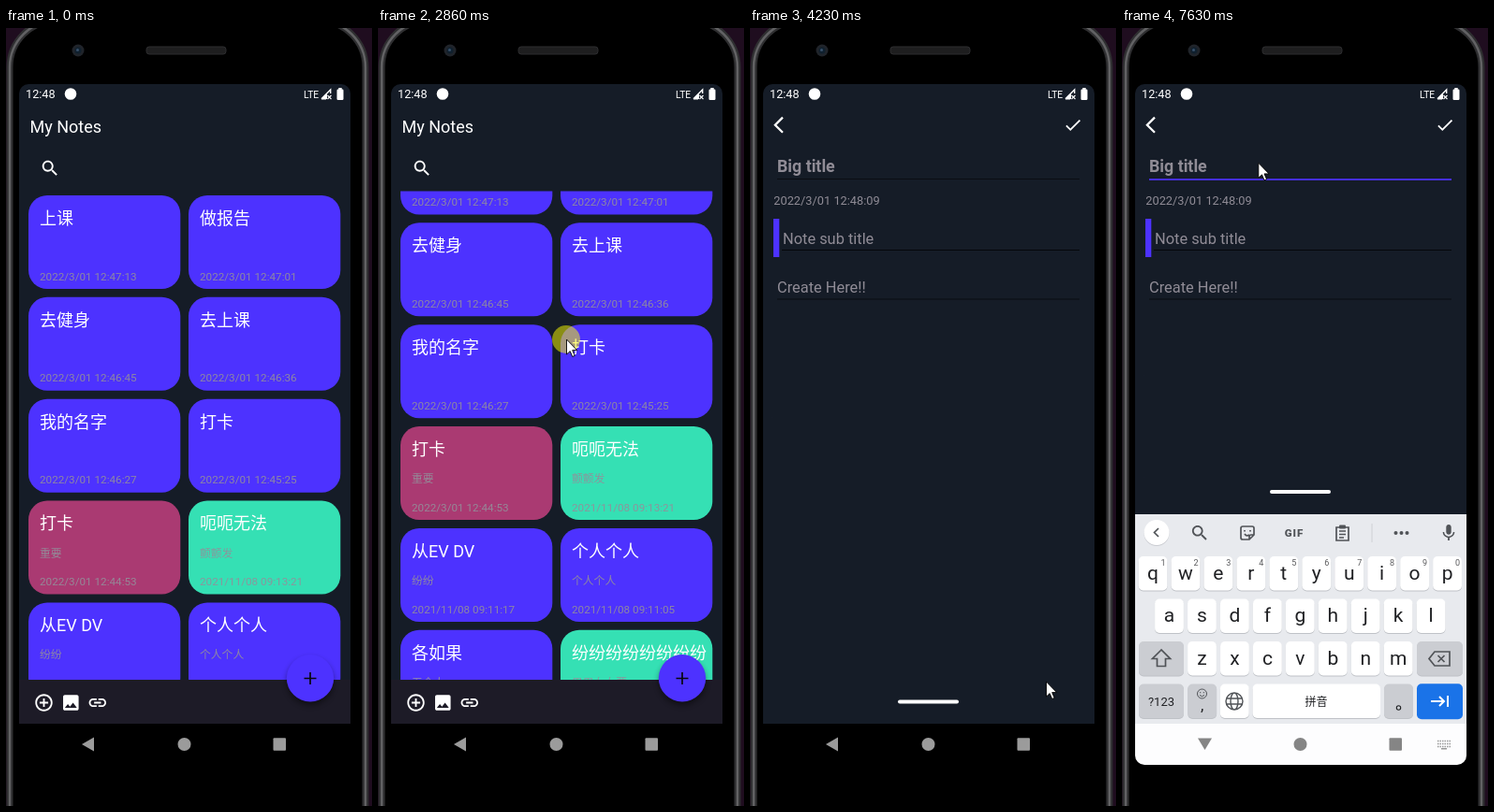
These frames come from a looping animation (391x832 px, 8 s). An HTML page:

```html
<!DOCTYPE html>
<html lang="zh-CN">
<head>
<meta charset="utf-8">
<style>
html, body { margin: 0; width: 100%; height: 100%; overflow: hidden; background: #1f0d1f; }
svg { display: block; width: 391px; height: 832px; }
text { font-family: Roboto, "Noto Sans CJK SC", "Noto Sans CJK", sans-serif; fill: #fff; white-space: pre; }
.dim { fill: #938f9a; opacity: .92; }
.hint { fill: #908c96; }
.key { fill: #202124; text-anchor: middle; }
.line { fill: none; stroke: #505357; stroke-width: 1.7; }
</style>
</head>
<body>
<svg id="stage" viewBox="0 0 391 832"></svg>
<script>
const BLUE = '#4d32ff', PINK = '#aa3a72', TEAL = '#35e0b4';

const rect = (x, y, w, h, fill, r = 0, more = '') =>
  `<rect x="${x}" y="${y}" width="${w}" height="${h}" rx="${r}" fill="${fill}" ${more}/>`;
const disc = (x, y, r, fill, more = '') => `<circle cx="${x}" cy="${y}" r="${r}" fill="${fill}" ${more}/>`;
const text = (x, y, size, str, more = '') => `<text x="${x}" y="${y}" font-size="${size}" ${more}>${str}</text>`;
const path = (d, more = '') => `<path d="${d}" ${more}/>`;
// 24-unit icon centred on a point
const icon = (x, y, scale, d, fill = '#fff') =>
  path(d, `fill="${fill}" transform="translate(${x} ${y}) scale(${scale}) translate(-12 -12)"`);

const ICONS = {
  search: 'M15.5 14h-.79l-.28-.27C15.41 12.59 16 11.11 16 9.5 16 5.91 13.09 3 9.5 3S3 5.91 3 9.5 5.91 16 9.5 16c1.61 0 3.09-.59 4.23-1.57l.27.28v.79l5 4.99L20.49 19l-4.99-5zm-6 0C7.01 14 5 11.99 5 9.5S7.01 5 9.5 5 14 7.01 14 9.5 11.99 14 9.5 14z',
  add: 'M13 7h-2v4H7v2h4v4h2v-4h4v-2h-4V7zm-1-5C6.48 2 2 6.48 2 12s4.48 10 10 10 10-4.48 10-10S17.52 2 12 2zm0 18c-4.41 0-8-3.59-8-8s3.59-8 8-8 8 3.59 8 8-3.59 8-8 8z',
  image: 'M21 19V5c0-1.1-.9-2-2-2H5c-1.1 0-2 .9-2 2v14c0 1.1.9 2 2 2h14c1.1 0 2-.9 2-2zM8.5 13.5l2.5 3.01L14.5 12l4.5 6H5l3.5-4.5z',
  link: 'M3.9 12c0-1.71 1.39-3.1 3.1-3.1h4V7H7c-2.76 0-5 2.24-5 5s2.24 5 5 5h4v-1.9H7c-1.71 0-3.1-1.39-3.1-3.1zM8 13h8v-2H8v2zm9-6h-4v1.9h4c1.71 0 3.1 1.39 3.1 3.1s-1.39 3.1-3.1 3.1h-4V17h4c2.76 0 5-2.24 5-5s-2.24-5-5-5z',
  check: 'M9 16.17L4.83 12l-1.42 1.41L9 19 21 7l-1.41-1.41z',
  back: 'M17.51 3.87L15.73 2.1 5.84 12l9.9 9.9 1.77-1.77L9.38 12l8.13-8.13z',
  mic: 'M12 14c1.66 0 2.99-1.34 2.99-3L15 5c0-1.66-1.34-3-3-3S9 3.34 9 5v6c0 1.66 1.34 3 3 3zm5.3-3c0 3-2.54 5.1-5.3 5.1S6.7 14 6.7 11H5c0 3.41 2.72 6.23 6 6.72V21h2v-3.28c3.28-.48 6-3.3 6-6.72h-1.7z'
};

const NOTES = [
  ['上课', '', '2022/3/01 12:47:13'], ['做报告', '', '2022/3/01 12:47:01'],
  ['去健身', '', '2022/3/01 12:46:45'], ['去上课', '', '2022/3/01 12:46:36'],
  ['我的名字', '', '2022/3/01 12:46:27'], ['打卡', '', '2022/3/01 12:45:25'],
  ['打卡', '重要', '2022/3/01 12:44:53', PINK], ['呃呃无法', '颤颤发', '2021/11/08 09:13:21', TEAL],
  ['从EV DV', '纷纷', '2021/11/08 09:11:17'], ['个人个人', '个人个人', '2021/11/08 09:11:05'],
  ['各如果', '五个人', '2021/11/08 09:10:52'], ['纷纷纷纷纷纷纷纷', '男男女女要', '2021/11/08 09:10:40', TEAL]
];

function card([title, sub, date, color = BLUE], i) {
  const x = i % 2 ? 195 : 24, y = 179 + 108.85 * (i >> 1);
  return rect(x, y, 162.3, 100, color, 20) +
    text(x + 12, y + 30.8, 18, title) +
    text(x + 12, y + 60, 11.8, sub, 'class="dim"') +
    text(x + 12, y + 90.6, 11.7, date, 'class="dim"');
}

const phone =
  rect(4, -8, 380, 900, '#000', 50, 'stroke="#2f2f31" stroke-width="7"') +
  rect(4, -8, 380, 900, 'none', 50, 'stroke="#626264" stroke-width="2.5"') +
  rect(150, 20, 85, 8, '#1e1e1f', 3, 'stroke="#2d2d2f"') +
  disc(77, 24, 6.5, '#20242a') + disc(77, 24, 3.5, '#10202e') + disc(76.5, 23.5, 1.5, '#38506a') +
  path('M14 744V70a10 10 0 0 1 10-10H358a10 10 0 0 1 10 10V744z', 'fill="#151c27"');

const statusBar =
  text(21, 75, 12.7, '12:48') + disc(69, 70.5, 6.3, '#fff') + text(318, 74.5, 10.3, 'LTE') +
  path('M337 75.7L346.7 66V70M337 75.7H342', 'fill="none" stroke="#fff" stroke-width="1.4"') +
  path('M337 76L343 70V76z', 'fill="#fff"') +
  path('M343.5 72l4 4m0-4l-4 4', 'stroke="#fff" stroke-width="1.1"') +
  rect(353.5, 65.5, 7, 11.5, '#fff', 1.2) + rect(355.3, 64, 3.4, 2, '#fff');

const listPage = `<g id="list">
  ${text(25.5, 112, 18, 'My Notes')}${icon(47, 150, .92, ICONS.search)}
  <g clip-path="url(#view)"><g id="cards">${NOTES.map(card).join('')}</g></g>
  ${rect(14, 697, 354, 47, '#1d1b27')}
  ${icon(40.5, 721.5, .92, ICONS.add)}${icon(69.3, 721.5, .92, ICONS.image)}${icon(97.8, 721.5, .92, ICONS.link)}
  ${disc(325, 699, 25, '#000', 'opacity=".45" filter="url(#soft)"')}${disc(325, 695.3, 25.2, BLUE)}
  ${disc(323, 695.8, 22.5, '#3b28c2', 'id="ripple"')}
  ${path('M318.5 695.5h13m-6.5-6.5v13', 'stroke="#08080c" stroke-width="1.7"')}
</g>`;

const editPage = `<g id="edit">
  ${icon(30.8, 103.7, .9, ICONS.back)}${icon(345, 103.7, .9, ICONS.check)}
  ${text(29, 154, 17.8, 'Big title', 'class="hint" font-weight="700"')}
  ${rect(29, 161, 323, 1, '#0a0d13', 0, 'id="underline"')}
  ${rect(29, 136, 2, 24, BLUE, 0, 'id="caret"')}
  ${text(25.3, 189, 12.8, '2022/3/01 12:48:09', 'class="hint"')}
  ${rect(25, 204, 6.3, 41, BLUE)}${text(35, 231, 16.4, 'Note sub title', 'class="hint"')}
  ${rect(34, 237, 318, 1, '#05070a')}
  ${text(29, 283, 16.4, 'Create Here!!', 'class="hint"')}${rect(29, 289.5, 323, 1, '#0a0d13')}
  ${rect(158, 718.6, 65, 4, '#fff', 2, 'id="handle"')}
</g>`;

const navShapes = (color, arrow) =>
  path(arrow, `fill="${color}"`) + disc(190.5, 766, 7, color) + rect(285.5, 759.3, 13.5, 13.5, color, 1);
const darkNav = `<g>${navShapes('#9b9b9b', 'M81 766L94 758.5V773.5z')}</g>`;
const lightNav = `<g id="lightNav">
  ${path('M14 744H368V778a10 10 0 0 1-10 10H24a10 10 0 0 1-10-10z', 'fill="#fdfdfe"')}
  ${navShapes('#858585', 'M81 759.5H96L88.5 772z')}
  ${path('M337 762.5h14M337 765.5h14M337 768.5h14', 'stroke="#999" stroke-width="1.5" stroke-dasharray="1.5 1"')}
  ${rect(341, 770, 6, 1.5, '#999')}
</g>`;

// One key cap with its shadow
const cap = (x, y, w, fill = '#fff', h = 36.5) => rect(x, y + 1, w, h, '#bfc2c7', 5) + rect(x, y, w, h, fill, 5);
const keyRow = (letters, first, y, digits) => [...letters].map((c, i) => {
  const x = first + 34.95 * i;
  return cap(x - 15.4, y, 30.8) + text(x, y + 24.7, 21, c, 'class="key"') +
    (digits ? text(x + 11, y + 10, 9, (i + 1) % 10, 'class="key" opacity=".75"') : '');
}).join('');
const line = (d, more = '') => path(d, `class="line" ${more}`);
const GRAY = '#cbcdd2';

const keyboard = `<g clip-path="url(#screen)"><g id="keyboard">
  ${rect(14, 520, 354, 224, '#e8eaee')}
  ${disc(37, 540.5, 13.5, '#c9cbd0')}${disc(37, 539.5, 13.5, '#fff')}${line('M39 535l-4.5 4.5 4.5 4.5')}
  ${icon(83, 540, .9, ICONS.search, '#505357')}
  ${line('M129 533h10a2 2 0 0 1 2 2v7l-5 5h-7a2 2 0 0 1-2-2v-10a2 2 0 0 1 2-2zM141 542h-3a2 2 0 0 0-2 2v3M131 541q2 3 5 1M131 537v1.5M137 537v1.5')}
  ${text(184, 543.5, 11.5, 'GIF', 'class="key" font-weight="900" letter-spacing="1" style="fill:#505357"')}
  ${line('M229 534h13v14h-13zM232 538h7M232 541.5h7M232 545h5')}${rect(232, 531.5, 7, 4, '#505357', 1)}
  ${rect(266.5, 530, 1, 20, '#cdd0d4')}
  ${[292.5, 298.5, 304.5].map(x => disc(x, 540, 2, '#505357')).join('')}
  ${icon(349, 540, .9, ICONS.mic, '#505357')}
  ${keyRow('qwertyuiop', 33, 565, true)}${keyRow('asdfghjkl', 50.5, 610.5)}${keyRow('zxcvbnm', 85.5, 656)}
  ${cap(18, 656, 48, GRAY)}${line('M42 665l-9.5 9.5h5v8h9v-8h5z')}
  ${cap(315, 656, 49, GRAY)}${line('M334 667h16v15h-16l-6-7.5zM337.5 671l7 7m0-7l-7 7')}
  ${cap(18, 701.5, 48, GRAY)}${text(42, 725, 13, '?123', 'class="key"')}
  ${cap(70.3, 701.5, 30.8, GRAY)}${line('M90.5 712a5 5 0 1 1-10 0a5 5 0 1 1 10 0M83 713.5q2.5 2.5 5 0M83.7 710v1.3M87.3 710v1.3', 'style="stroke-width:1"')}
  ${text(85.7, 730, 17, ',', 'class="key"')}
  ${cap(104.9, 701.5, 30.8)}
  ${line('M129 720a9 9 0 1 1-18 0a9 9 0 1 1 18 0M124 720a4 9 0 1 1-8 0a4 9 0 1 1 8 0M112 717h16M112 723h16', 'style="stroke-width:1.4"')}
  ${cap(139.5, 701.5, 136.5)}${text(207.5, 724.5, 12, '拼音', 'class="key"')}
  ${cap(280, 701.5, 31, GRAY)}${disc(295.5, 727, 2.2, 'none', 'stroke="#202124" stroke-width="1.1"')}
  ${rect(315, 701.3, 49, 38, '#1a73e8', 5)}
  ${path('M330 720h14m-5-5l5 5-5 5M348 714v12', 'fill="none" stroke="#fff" stroke-width="2"')}
</g></g>`;

const pointer = `<g id="pointer">${disc(0, 0, 15, '#ff0', 'id="press" opacity=".5"')}
  ${path('M.5 0V16L4.2 12.6 6.7 18.5 9.2 17.4 6.7 11.6H11.7z', 'fill="#fff" stroke="#000" stroke-width=".9"')}</g>`;

document.getElementById('stage').innerHTML = `<defs>
  <clipPath id="view">${rect(14, 174.5, 354, 522.5, '#000')}</clipPath>
  <clipPath id="screen">${rect(14, 60, 354, 684, '#000')}</clipPath>
  <filter id="soft" x="-30%" y="-30%" width="160%" height="160%"><feGaussianBlur stdDeviation="3"/></filter>
</defs>` + phone + statusBar + listPage + editPage + darkNav + keyboard + lightNav + pointer;

// Key points: [step, value...], one step being 125 ms
const PATH = [[4, 322, 724], [5, 270, 640], [6, 205, 510], [7, 150, 372], [8, 135, 317], [9, 150, 370], [10, 172, 410],
  [11, 176, 360], [12, 178, 294], [13, 177, 258], [14, 176, 252], [15, 178, 285], [16, 179, 345], [17, 180, 383],
  [19, 190, 412], [20, 194, 415], [23, 201, 333], [24, 204, 297], [25, 204, 275], [26, 205, 296], [28, 215, 405],
  [30, 360, 738], [31, 340, 722], [32, 316, 699], [34, 316, 699], [35, 290, 620], [36, 220, 420], [37, 152, 230],
  [38, 130, 161], [39, 131.3, 146.6], [40, 131.3, 146.6], [41, 145.3, 144.3]];
const SCROLL = [[10, 0], [11, 45], [12, 111], [13, 131], [14, 131], [15, 98], [16, 38], [17, 0],
  [20, 0], [23, 79.5], [24, 115], [25, 131], [26, 110], [28, 0]];
const KEYBOARD = [[42, 224], [43, 90], [44, 0]];
const PRESSED = [[10, 17], [20, 28], [41, 43]];
const CARET = [[41, 45], [49, 53], [57, 61]];

function at(keys, s) {
  const i = keys.findIndex(k => k[0] > s);
  if (i === 0) return keys[0].slice(1);
  if (i < 0) return keys[keys.length - 1].slice(1);
  const a = keys[i - 1], b = keys[i], p = (s - a[0]) / (b[0] - a[0]);
  return a.slice(1).map((v, j) => v + (b[j + 1] - v) * p);
}
const within = (spans, s) => spans.some(([a, b]) => s >= a && s < b);
const $ = id => document.getElementById(id);
const show = (id, on) => $(id).style.display = on ? '' : 'none';
const move = (id, x, y) => $(id).setAttribute('transform', `translate(${x} ${y})`);

function draw() {
  const s = Math.floor((performance.now() % 8000 + 25) / 125);
  const editing = s >= 34 && s < 64, focused = s >= 41 && editing;
  show('list', !editing);
  show('edit', editing);
  show('ripple', s === 32 || s === 33);
  show('pointer', s >= 4 && s < 64);
  show('press', within(PRESSED, s));
  show('caret', within(CARET, s));
  show('keyboard', s >= 43 && editing);
  show('lightNav', s >= 42 && editing);
  move('pointer', ...at(PATH, s));
  move('cards', 0, -at(SCROLL, s)[0]);
  move('keyboard', 0, at(KEYBOARD, s)[0]);
  move('handle', 0, s >= 43 ? -224.5 : 0);
  $('underline').setAttribute('fill', focused ? '#452edb' : '#0a0d13');
  $('underline').setAttribute('height', focused ? 2 : 1);
  requestAnimationFrame(draw);
}
draw();
</script>
</body>
</html>
```
